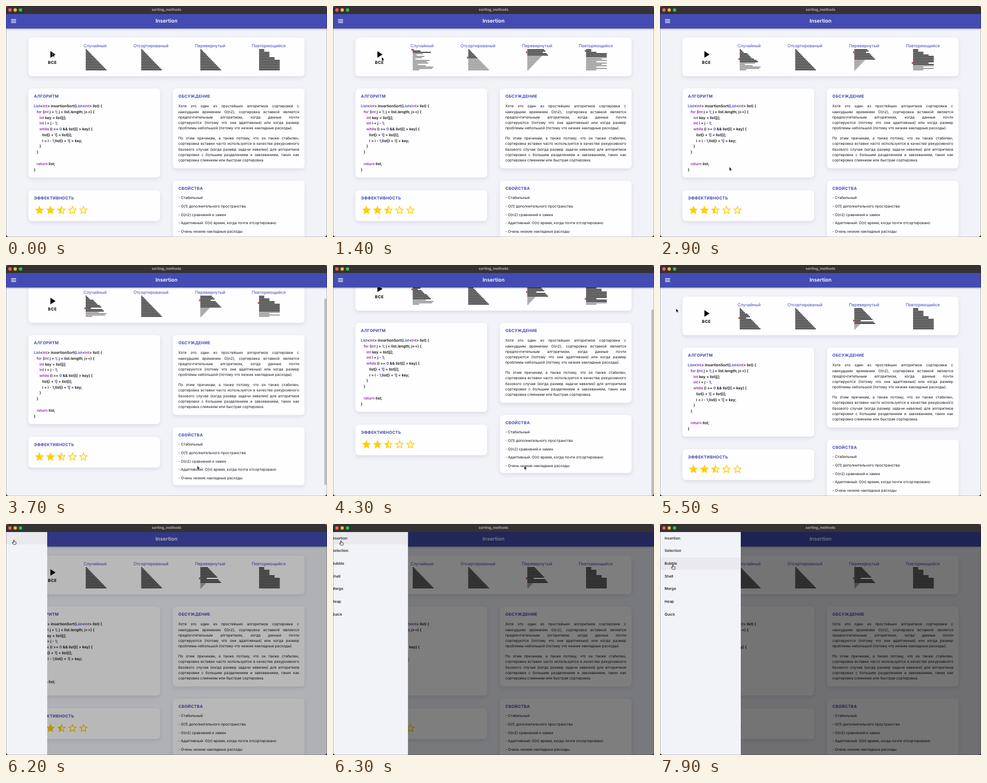
These frames come from a looping animation (600 px wide and 431 px high, 8 s). An HTML page:

```html
<!DOCTYPE html>
<html lang="ru">
<head>
<meta charset="utf-8">
<title>sorting_methods</title>
<style>
html, body { margin: 0; width: 100%; height: 100%; overflow: hidden; background: linear-gradient(#b04a30, #222 20px); }
#win {
  position: absolute; left: 0; top: 0; width: 600px; height: 431px; overflow: hidden;
  border-radius: 5px; background: #f2f3f9; color: #111;
  font: 6.82px Inter, "Open Sans", sans-serif; font-feature-settings: "calt" 0;
  text-rendering: geometricPrecision;
}
#win div, #win svg { position: absolute; }
#win svg { overflow: visible; left: 0; top: 0; }
#view { left: 0; top: 42px; width: 600px; height: 389px; overflow: hidden; }
#page { left: 0; top: -42px; width: 600px; height: 477px; animation: scroll 8s linear infinite; }
.card { border-radius: 6px; background: #fefdff; box-shadow: 0 3px 7px rgba(60, 62, 110, .13); }
#page h2 {
  position: absolute; left: 10.3px; top: 10px; margin: 0;
  font-size: 7.55px; line-height: 10px; font-weight: 700; letter-spacing: .3px; color: #3f48b4;
}
#page p, #page pre { position: absolute; left: 10px; margin: 0; white-space: nowrap; }
#page pre { top: 28px; font: 600 7px/10.78px Inter, sans-serif; white-space: pre; color: #0c0c0c; }
pre b { font-weight: 600; color: #8a27a8; }
pre i { font-style: normal; color: #3640b0; }
.text { width: 226px; line-height: 10.27px; }
.text span { display: block; text-align-last: justify; }
.text span:last-child { text-align-last: left; }
.list { line-height: 15.8px; }
#thumb {
  left: 595px; top: 42px; width: 3.5px; height: 348px; border-radius: 2px; background: #bcbdc2;
  opacity: 0; animation: thumb 8s linear infinite;
}
#bar { left: 0; top: 14px; width: 600px; height: 28px; background: #444cb4; box-shadow: 0 1px 3px rgba(0, 0, 0, .35); }
#bar span, #title span { position: absolute; left: 0; width: 600px; text-align: center; }
#bar span { top: 1px; line-height: 28px; font-size: 9.65px; font-weight: 600; color: #fff; }
#title { left: 0; top: 0; width: 600px; height: 14.5px; background: #353234; }
#title span { line-height: 14.5px; font-size: 6.7px; font-weight: 700; color: #b4b1b3; }
#scrim { left: 0; top: 14.5px; width: 600px; height: 417px; background: #000; opacity: 0; animation: scrim 8s linear infinite; }
#drawer {
  left: 0; top: 14.5px; width: 151px; height: 417px; background: #f2f3f9; overflow: hidden;
  transform: translateX(-160px); animation: drawer 8s linear infinite;
}
#hover { left: 0; top: 0; width: 151px; height: 23.7px; background: #e9e9ee; animation: hover 8s step-end infinite; }
#drawer p { position: relative; margin: 0; padding-left: 8.5px; line-height: 23.7px; font-size: 7px; font-weight: 500; }
#edge { inset: 0; border-radius: 5px; box-shadow: inset 0 0 0 .6px rgba(0, 0, 0, .4); }
#cursor { left: 0; top: 0; animation: point 8s ease-in-out infinite; }
#arrow { animation: arrow 8s step-end infinite; }
#hand { animation: hand 8s step-end infinite; }
@keyframes scroll {
  0%, 43.75% { transform: none; animation-timing-function: ease-in-out; }
  48.75%, 58.75% { transform: translateY(-46px); animation-timing-function: ease-in-out; }
  63.75%, 100% { transform: none; }
}
@keyframes thumb {
  0%, 43.75% { opacity: 0; transform: none; }
  45% { opacity: 1; }
  48.75%, 58.75% { transform: translateY(41px); }
  63.75% { opacity: 1; transform: none; }
  67.5%, 100% { opacity: 0; transform: none; }
}
@keyframes drawer {
  0%, 76% { transform: translateX(-151px); }
  78.75% { transform: translateX(-11px); }
  80%, 100% { transform: none; }
}
@keyframes scrim {
  0%, 76% { opacity: 0; }
  78.75% { opacity: .5; }
  80%, 100% { opacity: .54; }
}
@keyframes hover {
  0% { transform: none; }
  90.2% { transform: translateY(23.7px); }
  93.6%, 100% { transform: translateY(47.4px); }
}
@keyframes point {
  0%, 8% { transform: translate(86.5px, 88px); }
  15%, 24% { transform: translate(91px, 95px); }
  33.75%, 36.25% { transform: translate(129.5px, 300px); }
  43.5%, 59.5% { transform: translate(357.5px, 374.5px); }
  67.5%, 69% { transform: translate(30px, 81px); }
  73%, 76% { transform: translate(14px, 28px); }
  78.75%, 87% { transform: translate(15px, 31.5px); }
  97%, 100% { transform: translate(24px, 76.5px); }
}
@keyframes arrow { 0% { opacity: 1; } 73%, 100% { opacity: 0; } }
@keyframes hand { 0% { opacity: 0; } 73%, 100% { opacity: 1; } }
</style>
</head>
<body>
<div id="win">
  <div id="view"><div id="page">
    <div class="card" style="left:42px;top:59px;width:515.5px;height:71.5px"></div>
    <div class="card" style="left:42px;top:154px;width:246px;height:166px">
      <h2>АЛГОРИТМ</h2>
<pre><i>List</i>&lt;<b>int</b>&gt; insertionSort(<i>List</i>&lt;<b>int</b>&gt; list) {
   <b>for</b> (<b>int</b> j = <i>1</i>; j &lt; list.length; j++) {
      <b>int</b> key = list[j];
      <b>int</b> i = j - <i>1</i>;
      <b>while</b> (i &gt;= <i>0</i> &amp;&amp; list[i] &gt; key) {
         list[i + <i>1</i>] = list[i];
         i = i - <i>1</i>;list[i + <i>1</i>] = key;
      }
   }

   <b>return</b> list;
}</pre>
    </div>
    <div class="card" style="left:42px;top:344px;width:246px;height:56.5px"><h2>ЭФФЕКТИВНОСТЬ</h2></div>
    <div class="card" style="left:312px;top:154px;width:246px;height:148.5px">
      <h2>ОБСУЖДЕНИЕ</h2>
      <p class="text" style="top:28.3px"><span>Хотя это один из простейших алгоритмов сортировки с</span><span>наихудшим временем O(n2), сортировка вставкой является</span><span>предпочтительным алгоритмом, когда данные почти</span><span>сортируются (потому что они адаптивные) или когда размер</span><span>проблемы небольшой (потому что низкие накладные расходы).</span></p>
      <p class="text" style="top:88px"><span>По этим причинам, а также потому, что он также стабилен,</span><span>сортировка вставки часто используется в качестве рекурсивного</span><span>базового случая (когда размер задачи невелик) для алгоритмов</span><span>сортировки с большим разделением и завоеванием, таких как</span><span>сортировка слиянием или быстрая сортировка.</span></p>
    </div>
    <div class="card" style="left:312px;top:326px;width:246px;height:108px">
      <h2>СВОЙСТВА</h2>
      <p class="list" style="top:24px">- Стабильный<br>- O(1) дополнительного пространства<br>- O(n2) сравнений и замен<br>- Адаптивный: O(n) время, когда почти отсортировано<br>- Очень низкие накладные расходы</p>
    </div>
    <svg width="600" height="477">
      <defs>
        <path id="full" d="M12 17.27L18.18 21l-1.64-7.03L22 9.24l-7.19-.61L12 2 9.19 8.63 2 9.24l5.46 4.73L5.82 21z"/>
        <path id="line" d="M22 9.24l-7.19-.62L12 2 9.19 8.63 2 9.24l5.46 4.73L5.82 21 12 17.27 18.18 21l-1.63-7.03zM12 15.4l-3.76 2.27 1-4.28-3.32-2.88 4.38-.38L12 6.1l1.71 4.04 4.38.38-3.32 2.88 1 4.28z"/>
        <path id="half" d="M22 9.24l-7.19-.62L12 2 9.19 8.63 2 9.24l5.46 4.73L5.82 21 12 17.27 18.18 21l-1.63-7.03zM12 15.4V6.1l1.71 4.04 4.38.38-3.32 2.88 1 4.28z"/>
      </defs>
      <path d="M83 84.3V96.5L92.6 90.4z"/>
      <text x="86.8" y="107.8" font-size="7.5" font-weight="700" letter-spacing=".5" text-anchor="middle">ВСЕ</text>
      <g id="labels" font-size="7.85" fill="#3f48b4" text-anchor="middle"></g>
      <g id="charts" fill="none" stroke-width="1.45"></g>
      <g fill="#fbd008" transform="translate(52.2 370.6) scale(.858)">
        <use href="#full"/><use href="#full" x="24"/><use href="#half" x="48"/><use href="#line" x="72"/><use href="#line" x="96"/>
      </g>
    </svg>
  </div></div>
  <div id="thumb"></div>
  <div id="bar">
    <span>Insertion</span>
    <svg width="30" height="28"><path d="M9.5 11.3h9.3M9.5 14.1h9.3M9.5 16.9h9.3" stroke="#fff" stroke-width="1.2"/></svg>
  </div>
  <div id="scrim"></div>
  <div id="drawer">
    <div id="hover"></div>
    <p>Insertion</p><p>Selection</p><p>Bubble</p><p>Shell</p><p>Merge</p><p>Heap</p><p>Quick</p>
  </div>
  <div id="title">
    <span>sorting_methods</span>
    <svg width="40" height="14"><circle cx="7.4" cy="7.4" r="3.1" fill="#fe5f57"/><circle cx="17.2" cy="7.4" r="3.1" fill="#febb2e"/><circle cx="27.2" cy="7.4" r="3.1" fill="#28c840"/></svg>
  </div>
  <div id="edge"></div>
  <svg id="cursor" width="10" height="12" stroke="#fff" stroke-linejoin="round">
    <path id="arrow" d="M0 0V7.4L1.7 5.9 2.8 8.4 4 7.9 2.9 5.4H5.2z" stroke-width=".6"/>
    <path id="hand" d="M-.7.3Q0-.6.7.3V3L4 3.7Q4.6 4 4.4 5L3.7 8H-.7L-3 5Q-3.2 4-2.2 4.2L-.7 5.2z" fill="#fff" stroke="#000" stroke-width=".8"/>
  </svg>
</div>
<script>
const LOOP = 8000, START = 420, SIZE = 16;
const range = f => Array.from({ length: SIZE }, (_, i) => f(i));

// keys: [time, step] pairs between which sorting runs evenly
const charts = [
  { name: 'Случайный', x: 149, mid: 166.6, unit: 2.42,
    values: [6, 14, 1, 8, 3, 9, 7, 2, 13, 11, 12, 4, 10, 16, 15, 5],
    keys: [[START, 0], [1400, 3.4], [2900, 27.4], [4300, 38.4], [5500, 56.4], [5800, 60]] },
  { name: 'Отсортированый', x: 252.7, mid: 270.9, unit: 2.42,
    values: range(i => i + 1),
    keys: [[START, 0], [1400, 5.5], [2350, 15]] },
  { name: 'Перевернутый', x: 363.2, mid: 381.6, unit: 2.42,
    values: range(i => SIZE - i),
    keys: [[START, 0], [1400, 11.4], [2900, 32.4], [4300, 47.4], [5500, 67.4], [5600, 68]] },
  { name: 'Повторяющийся', x: 473, mid: 491, unit: 9.68,
    values: [2, 4, 4, 1, 4, 1, 4, 3, 4, 2, 4, 3, 4, 2, 4, 2],
    keys: [[START, 0], [1400, 11.4], [2900, 28.4], [4300, 37.4], [5400, 57]] }
];

function add(parent, tag, attrs) {
  const el = document.createElementNS('http://www.w3.org/2000/svg', tag);
  for (const k in attrs) el.setAttribute(k, attrs[k]);
  return document.getElementById(parent).appendChild(el);
}

for (const c of charts) {
  add('labels', 'text', { x: c.mid, y: 76.7 }).textContent = c.name;
  c.done = add('charts', 'path', { stroke: '#000' });
  c.rest = add('charts', 'path', { stroke: '#777' });
  c.mark = add('charts', 'path', { fill: '#d3302f', stroke: '#6b1a1a', 'stroke-width': .3 });
}

function stepAt(keys, t) {
  if (t < START) return Infinity;
  const i = keys.findIndex(k => k[0] > t);
  if (i < 0) return keys.at(-1)[1];
  const [t0, s0] = keys[i - 1], [t1, s1] = keys[i];
  return Math.floor(s0 + (s1 - s0) * (t - t0) / (t1 - t0));
}

// Insertion sort halted after the given number of steps
function sortTo(values, steps) {
  const a = [...values];
  for (let j = 1; j < SIZE; j++) {
    for (let k = j; ; k--) {
      if (steps-- < 1) return { a, at: k, last: j };
      if (k === 0 || a[k - 1] <= a[k]) break;
      [a[k - 1], a[k]] = [a[k], a[k - 1]];
    }
  }
  return { a, at: -1, last: SIZE };
}

const rowY = i => 81.4 + i * 2.5;

function draw(c, t) {
  const { a, at, last } = sortTo(c.values, stepAt(c.keys, t));
  const bars = a.map((v, i) => `M${c.x} ${rowY(i)}h${v * c.unit}`);
  c.done.setAttribute('d', bars.slice(0, last + 1).join(''));
  c.rest.setAttribute('d', bars.slice(last + 1).join(''));
  c.mark.setAttribute('d', at < 0 ? '' : `M${c.x - 2} ${rowY(at) - 1.8}l3.2 1.8l-3.2 1.8z`);
}

let begin;
function tick(now) {
  begin ??= now;
  const t = (now - begin) % LOOP;
  charts.forEach(c => draw(c, t));
  requestAnimationFrame(tick);
}
requestAnimationFrame(tick);
</script>
</body>
</html>
```
